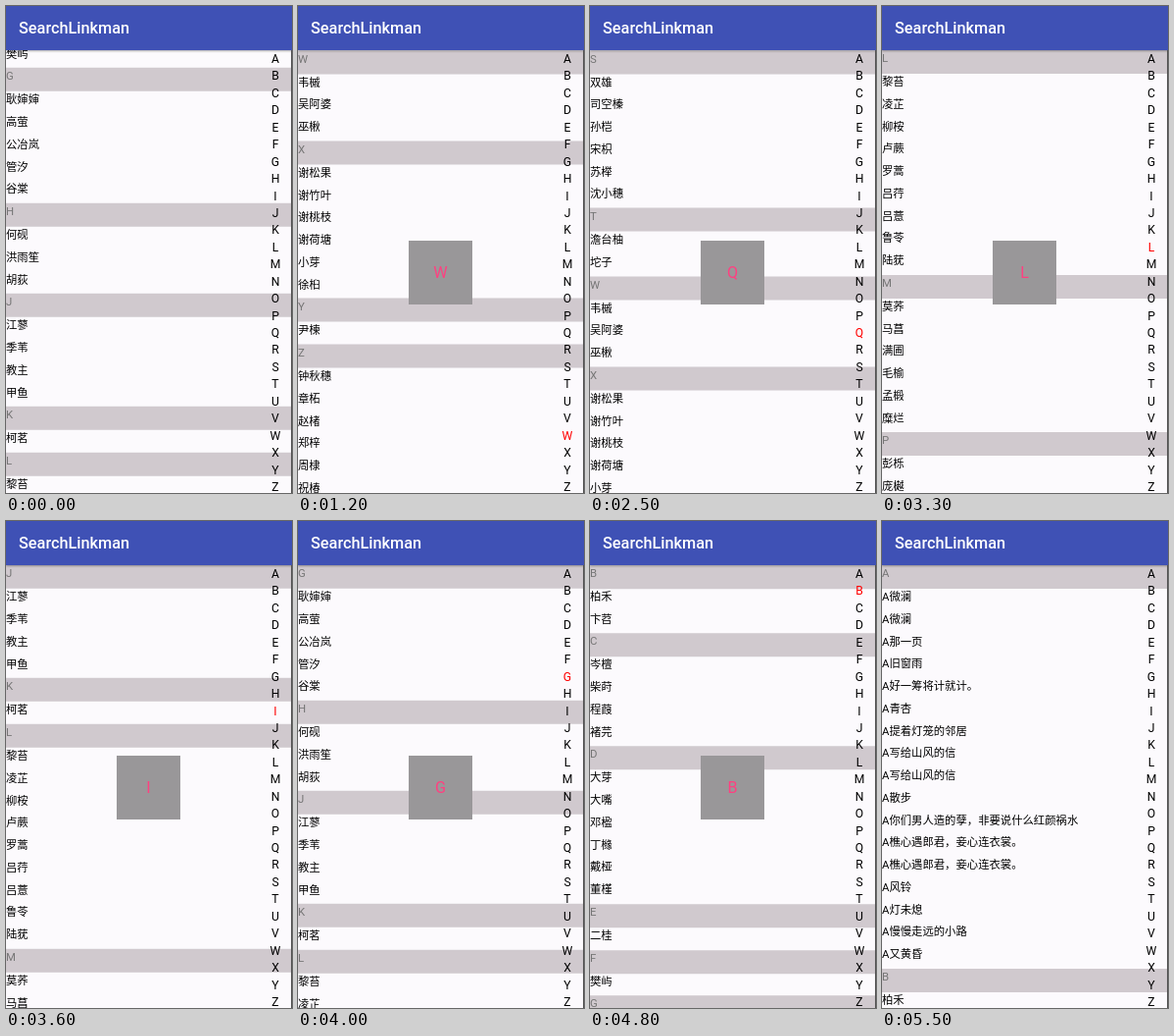
An HTML page that plays this animation: 292x496 px, repeating every 8000 ms.

```html
<!DOCTYPE html>
<html lang="zh-CN">
<head>
<meta charset="utf-8">
<title>SearchLinkman</title>
<style>
  html, body { margin: 0; width: 100%; height: 100%; overflow: hidden; }
  body { position: relative; background: #fcfafd; color: #000; font: 11.35px Roboto, "Noto Sans CJK SC", "Noto Sans CJK", sans-serif; }
  #bar { position: absolute; inset: 0 0 auto; height: 45px; background: #3f51b5; color: #fff;
         font-size: 16.3px; font-weight: 500; line-height: 46px; text-indent: 13px; box-shadow: 0 1px 2px #0005; }
  #view { position: absolute; inset: 45px 0 0; overflow: hidden; }
  #list div { height: 22.75px; line-height: 17px; white-space: nowrap; }
  #list .head { height: 24px; line-height: 16px; background: #d0c9ce; color: #757575; }
  #side span { position: absolute; left: 265px; width: 20px; line-height: 18px; font-size: 12.2px; text-align: center; }
  #side .on { color: #f00; }
  #popup { position: absolute; left: 113px; top: 239px; width: 65px; height: 65px; background: #999799;
           color: #ff4081; font-size: 16.2px; line-height: 66px; text-align: center; }
  #edge { position: absolute; left: 291px; top: 45px; width: 1px; bottom: 0; background: #555; }
</style>
</head>
<body>
<div id="view"><div id="list"></div></div>
<div id="bar">SearchLinkman</div>
<div id="side"></div>
<div id="popup"></div>
<div id="edge"></div>
<script>
const HEAD = 24, ROW = 22.75, VIEW = 451, LOOP = 8000;

const contacts = {
  A: 'A微澜 A微澜 A那一页 A旧窗雨 A好一筹将计就计。 A青杏 A提着灯笼的邻居 A写给山风的信 A写给山风的信 A散步 ' +
     'A你们男人造的孽，非要说什么红颜祸水 A樵心遇郎君，妾心连衣裳。 A樵心遇郎君，妾心连衣裳。 A风铃 A灯未熄 A慢慢走远的小路 A又黄昏',
  B: '柏禾 卞苕',
  C: '岑檀 柴莳 程葭 褚芫',
  D: '大芽 大嘴 邓楹 丁橼 戴桠 董槿',
  E: '二桂',
  F: '樊屿',
  G: '耿婶婶 高萤 公冶岚 管汐 谷棠',
  H: '何砚 洪雨笙 胡荻',
  J: '江蓼 季苇 教主 甲鱼',
  K: '柯茗',
  L: '黎苔 凌芷 柳桉 卢蕨 罗蒿 吕荇 吕薏 鲁苓 陆莸',
  M: '莫荞 马菖 满圃 毛榆 孟椴 糜烂',
  P: '彭栎 庞樾 潘槠',
  S: '双雄 司空榛 孙桤 宋枳 苏榉 沈小穗',
  T: '澹台柚 坨子',
  W: '韦槭 吴阿婆 巫楸',
  X: '谢松果 谢竹叶 谢桃枝 谢荷塘 小芽 徐桕',
  Y: '尹楝',
  Z: '钟秋穗 章柘 赵楮 郑梓 周棣 祝椿 邹榧 竺楠 翟枸 臧桫 卓檫 詹梾'
};

// Finger path on the index: time in ms, letter touched
const touches = [
  [1200, 'W'], [1400, 'X'], [1600, 'Y'], [1700, 'Z'], [1800, 'Y'], [1900, 'X'], [2000, 'W'],
  [2100, 'V'], [2200, 'U'], [2300, 'T'], [2400, 'R'], [2500, 'Q'], [2700, 'P'], [2800, 'O'],
  [2900, 'N'], [3100, 'M'], [3300, 'L'], [3400, 'K'], [3500, 'J'], [3600, 'I'], [3800, 'H'],
  [4000, 'G'], [4100, 'F'], [4300, 'E'], [4400, 'D'], [4500, 'C'], [4700, 'B'], [4900, 'A'], [5500, '']
];

const $ = id => document.getElementById(id);
const list = $('list'), side = $('side'), popup = $('popup');

function add(parent, tag, text, className = '') {
  const el = document.createElement(tag);
  el.textContent = text;
  el.className = className;
  parent.append(el);
  return el;
}

const tops = {};
let total = 0;
for (const [letter, names] of Object.entries(contacts)) {
  tops[letter] = total;
  const rows = names.split(' ');
  add(list, 'div', letter, 'head');
  rows.forEach(name => add(list, 'div', name));
  total += HEAD + rows.length * ROW;
}

const letters = [...'ABCDEFGHIJKLMNOPQRSTUVWXYZ'].map((letter, i) => {
  const el = add(side, 'span', letter);
  el.style.top = 45 + i * 17.44 + 'px';
  return el;
});

// Letters without a section keep the list at the next section the finger passed
function scrollFor(letter) {
  const section = Object.keys(tops).find(key => key >= letter);
  return Math.min(tops[section], total - VIEW);
}

function draw(now) {
  const t = now % LOOP;
  const last = touches.filter(([time]) => time <= t).pop();
  const letter = last ? last[1] : '';
  const scroll = last ? scrollFor(letter) : tops.G - 18;
  list.style.transform = `translateY(${-scroll}px)`;
  letters.forEach(el => el.className = el.textContent === letter ? 'on' : '');
  popup.textContent = letter;
  popup.style.display = letter ? '' : 'none';
}

const start = performance.now();
function tick() {
  draw(performance.now() - start);
  requestAnimationFrame(tick);
}
tick();
</script>
</body>
</html>
```
